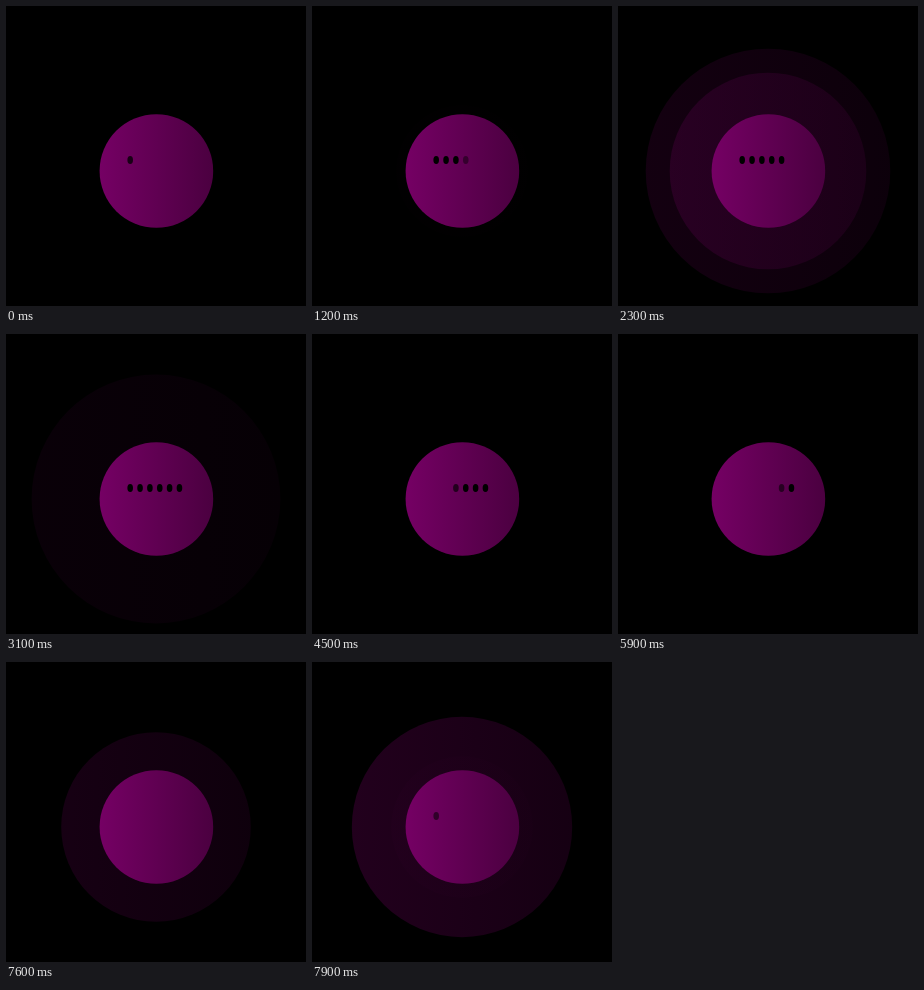
Animation, 300 px wide and 300 px high, one loop 8 s. Source, as an HTML page:

```html
<!DOCTYPE html>
<html lang="en">
<head>
<meta charset="utf-8">
<title>Typing dots</title>
<style>
  html, body { margin: 0; width: 100%; height: 100%; overflow: hidden; background: #000; }
  svg { display: block; width: 100vw; height: 100vh; }
</style>
</head>
<body>
<svg viewBox="0 0 300 300">
  <defs>
    <linearGradient id="purple">
      <stop offset="0" stop-color="#750064"/>
      <stop offset="1" stop-color="#4b0040"/>
    </linearGradient>
  </defs>
  <g id="pulses" fill="url(#purple)"></g>
  <circle cx="150.4" cy="165" r="56.8" fill="url(#purple)"/>
  <g id="dots" fill="#000"></g>
</svg>
<script>
const LOOP = 8000;
const STEP = 100;
const DOTS = 6;

const FADE_IN = 450;
const FADE_OUT = 550;

const BURST_START = 1100;
const BURST_EVERY = 6000;
const PULSE_GAP = 640;
const PULSE_GROWTH = 1500;
const PULSE_LIFE = 1650;

const clamp = v => Math.min(1, Math.max(0, v));

function add(parent, tag, attrs) {
  const el = document.createElementNS("http://www.w3.org/2000/svg", tag);
  for (const key in attrs) el.setAttribute(key, attrs[key]);
  return document.getElementById(parent).appendChild(el);
}

const dots = Array.from({ length: DOTS }, (_, i) =>
  add("dots", "ellipse", { cx: 124.2 + i * 9.85, cy: 154, rx: 2.8, ry: 4 }));

// Two bursts of two pulses each.
const pulses = Array.from({ length: 4 }, (_, i) => ({
  el: add("pulses", "circle", { cx: 150, cy: 165 }),
  start: BURST_START + BURST_EVERY * Math.floor(i / 2) + PULSE_GAP * (i % 2)
}));

// Each dot follows the one before it after a slowly growing delay.
function dotAlpha(i, t) {
  const inMid = -120 + 300 * i + 50 * i * i;
  const outMid = 3500 + 470 * i + 35 * i * i;
  const shown = clamp((t - inMid) / FADE_IN + 0.5);
  const hidden = clamp((t - outMid) / FADE_OUT + 0.5);
  return shown * (1 - hidden);
}

function drawPulse({ el, start }, t) {
  const age = t - start;
  const left = 1 - clamp(age / PULSE_GROWTH);
  const swell = Math.sin(Math.PI * clamp(age / PULSE_LIFE));
  el.setAttribute("r", 57 + 68 * (1 - left ** 2));
  el.setAttribute("opacity", 0.29 * swell ** 2);
}

function draw(now) {
  const t = Math.floor((now % LOOP) / STEP) * STEP;
  dots.forEach((dot, i) =>
    dot.setAttribute("opacity", dotAlpha(i, t) + dotAlpha(i, t - LOOP)));
  pulses.forEach(pulse => drawPulse(pulse, t));
}

const began = performance.now();
function tick() {
  draw(performance.now() - began);
  requestAnimationFrame(tick);
}
tick();
</script>
</body>
</html>
```
